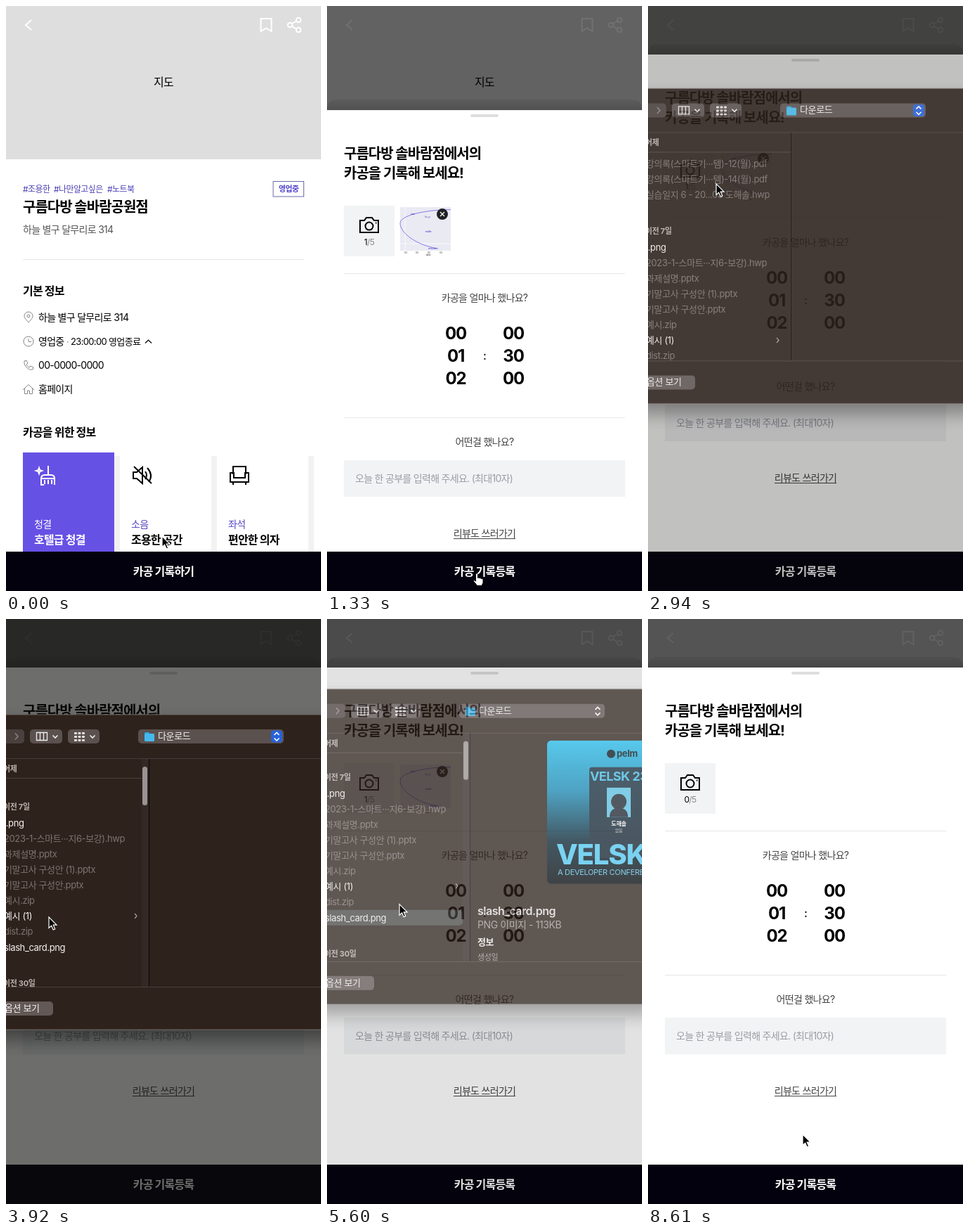
An HTML page for the animation above (9.03 s loop, 448 px wide and 832 px high).

```html
<!DOCTYPE html>
<html lang="ko">
<head>
<meta charset="utf-8">
<style>
html, body { margin: 0; width: 100%; height: 100%; overflow: hidden; background: #fff; }
#stage { display: block; width: 448px; height: 832px; }
text { font-family: Inter, "Noto Sans CJK KR", "Noto Sans CJK", sans-serif; letter-spacing: -.05em; white-space: pre; }
#dialog text { letter-spacing: -.03em; }
</style>
</head>
<body>
<svg id="stage" viewBox="0 0 448 832"></svg>
<script>
const LOOP = 9030;
const SHOP = '구름다방', ADDRESS = '하늘 별구 달무리로 314', EVENT = 'VELSK';

// y is the vertical middle of the line
const text = (x, y, size, str, fill = '#000', weight = 400, anchor = 'start') =>
  `<text x="${x}" y="${y + size * .36}" font-size="${size}" fill="${fill}" font-weight="${weight}" text-anchor="${anchor}">${str}</text>`;
const mid = (x, y, size, str, fill, weight) => text(x, y, size, str, fill, weight, 'middle');
const rect = (x, y, w, h, fill, r = 0, more = '') =>
  `<rect x="${x}" y="${y}" width="${w}" height="${h}" rx="${r}" fill="${fill}" ${more}/>`;
const path = (d, stroke, width = 1, more = '') =>
  `<path d="${d}" fill="none" stroke="${stroke}" stroke-width="${width}" ${more}/>`;
const divider = y => rect(24, y, 400, 1, '#e6e6e8');

function card(x, label, value, icon, active) {
  return (active ? rect(x, 635, 130, 141, '#6651e5') : rect(x, 635, 130, 141, '#fff') + rect(x + 130, 640, 8, 136, '#f2f2f3')) +
    path(icon, active ? '#fff' : '#000', 2, `transform="translate(${x + 16} 652)"`) +
    text(x + 16, 737, 14, label, active ? '#fff' : '#5546c4') +
    text(x + 16, 759, 16, value, active ? '#fff' : '#000', 700);
}

function page() {
  const rows = [443, 477, 511, 545];
  const icons = [
    'M8 15C4 10.500 2 8.500 2 6a6 6 0 0 1 12 0c0 2.500-2 4.500-6 9zM10 6a2 2 0 1 0-4 0a2 2 0 1 0 4 0',
    'M15 8a7 7 0 1 0-14 0a7 7 0 1 0 14 0M8 4v4.500h4',
    'M2 2l3-1l2 4l-2 2c1 2 2 3 4 4l2-2l4 2l-1 3C8 15.500 1 9 2 2z',
    'M0 9L8 1.500L16 9M2.500 7v7.500h4V10h3v4.500h4V7'
  ];
  return rect(0, 0, 448, 832, '#fff') + rect(0, 0, 448, 218, '#dedede') +
    path('M36 20L28 27L36 34M362.500 18H377.500V36L370 31.500L362.500 36ZM406 25.500L413 21.500M406 28.500L413 32.500', '#fff', 2) +
    [[404, 27], [416, 20], [416, 34]].map(([x, y]) =>
      `<circle cx="${x}" cy="${y}" r="3.300" fill="none" stroke="#fff" stroke-width="2"/>`).join('') +
    mid(224, 108, 16, '지도') +
    [[24, '#조용한'], [68, '#나만알고싶은'], [144, '#노트북']].map(([x, s]) => text(x, 261, 12, s, '#4d40b4')).join('') +
    rect(380, 249.5, 43.5, 21.5, '#fff', 0, 'stroke="#686ca6"') + mid(402, 260, 11, '영업중', '#5145d0', 700) +
    text(24, 286, 20, SHOP + ' 솔바람공원점', '#000', 700) +
    text(24, 318, 14, ADDRESS, '#555') + divider(360) +
    text(24, 405, 16, '기본 정보', '#000', 700) +
    rows.map((y, i) => path(icons[i], '#858585', 1, `transform="translate(24 ${y - 8})"`)).join('') +
    text(46, 443, 14, ADDRESS) + text(46, 477, 14, '영업중') + text(86, 477, 13, '·', '#888') +
    text(92, 477, 13, '23:00:00 영업종료') + path('M198 479.500L202.500 475L207 479.500', '#000', 1.2) +
    text(46, 511, 14, '00-0000-0000') + text(46, 545, 14, '홈페이지') +
    text(24, 606, 16, '카공을 위한 정보', '#000', 700) +
    rect(154, 640, 8, 136, '#f2f2f3') +
    card(24, '청결', '호텔급 청결', 'M20 2V14M10 29V20q0-5 5-5h9q5 0 5 5V29M10 20H29M15 22V28M20 22V28M25 22V28M9 29H14M7 5l1 3l3 1l-3 1l-1 3l-1-3l-3-1l3-1z', true) +
    card(162, '소음', '조용한 공간', 'M3 11H8L16 4V27L8 20H3ZM20 10q4 5 0 11M23 5q9 10 2 20M4 3L29 27') +
    card(300, '좌석', '편안한 의자', 'M7 14V3H25V14M3 12H8V19H24V12H29V25H3ZM7 25V29M25 25V29') +
    rect(438, 635, 10, 141, '#fff');
}

function poster(x, y, size) {
  return `<svg x="${x}" y="${y}" width="${size}" height="${size}" viewBox="0 0 204 204">` +
    rect(0, 0, 204, 204, 'url(#sea)', 6) +
    '<circle cx="91" cy="19" r="6" fill="#06141d"/>' + text(99, 18, 13, 'pelm', '#06141d', 700) +
    rect(60, 38, 84, 129, '#122331', 4, 'opacity=".93"') + mid(102, 51, 18, EVENT + ' 23', '#42bfe8', 700) +
    rect(85, 67, 34, 42, '#5cc4e8') +
    '<path d="M89 109q0-13 13-13t13 13z" fill="#1b2530"/><circle cx="102" cy="87" r="11" fill="#1b2530"/>' +
    mid(102, 118, 8, '도해솔', '#fff', 700) + mid(102, 128, 6, '없음', '#ccc') +
    text(13, 162, 40, EVENT + ' 23', '#53cdf7', 800) +
    text(15, 187, 11, 'A DEVELOPER CONFERENCE BY PELM', '#66c8ea') + '</svg>';
}

const closeMark = x => `<circle cx="${x}" cy="148" r="8" fill="#1f2024"/>` +
  path(`M${x - 3} 145l6 6m0-6l-6 6`, '#fff', 1.3);

function chart() {
  return rect(104, 138, 72, 62, '#eaeaf3') + path('M111 138V200M104 190H176', '#f8f8fc') +
    path('M176 141.500C137 142 104 150 104 161C104 174 126 192 158 197', '#5a4de0', .7) +
    [[122, 148, 'start'], [143, 152, 'f(x, y)'], [144, 173, 'middle'], [150, 197, 'end point']]
      .map(([x, y, s]) => mid(x, y, 3, s, '#3527c0')).join('') +
    [112, 128, 145, 162].map(x => mid(x, 203, 3, '0.5', '#222')).join('') +
    mid(144, 206, 3, 'value', '#222');
}

function sheet() {
  const digits = (x, list) => list.map((s, i) => mid(x, 317 + i * 32, 24, s, '#000', 700)).join('');
  return '<path d="M0 0V-2Q0-15 16-15H432Q448-15 448-2V0Z" fill="url(#lip)"/>' +
    rect(0, 0, 448, 832, '#fff') + rect(204, 6, 40, 4, '#dedede', 2) +
    text(24, 62, 20, SHOP + ' 솔바람점에서의', '#000', 700) + text(24, 90, 20, '카공을 기록해 보세요!', '#000', 700) +
    rect(24, 136, 72, 72, '#f2f3f5') +
    path('M47 157H53L56 153H64L67 157H73V174H47ZM65.500 165a5.500 5.500 0 1 0-11 0a5.500 5.500 0 1 0 11 0M69 160.500h1.500', '#000', 2) +
    mid(60, 188, 12, '<tspan id="count">1</tspan><tspan fill="#888">/5</tspan>') +
    `<g id="first">${chart()}${closeMark(164)}</g>` +
    `<g id="second">${poster(104, 136, 72)}${closeMark(164)}</g>` +
    divider(232) + mid(224, 267, 14, '카공을 얼마나 했나요?', '#444') +
    digits(183, ['00', '01', '02']) + digits(265, ['00', '30', '00']) + mid(224, 349, 16, ':', '#000', 500) +
    divider(437) + mid(224, 472, 14, '어떤걸 했나요?', '#444') +
    rect(24, 498, 400, 52, '#f2f3f5') + text(40, 524, 14, '오늘 한 공부를 입력해 주세요. (최대10자)', '#9b9ca5') +
    mid(224, 602, 14, '리뷰도 쓰러가기', '#444') + rect(180, 609, 88, 1, '#444');
}

function dialog() {
  const files = [
    [107, '강의록(스마트기···템)-12(월).pdf'], [129, '강의록(스마트기···템)-14(월).pdf'], [151, '실습일지 6 - 20...03 도해솔.hwp'],
    [226, 'l.png', 1], [248, '2023-1-스마트···지6-보강).hwp'], [270, '과제설명.pptx'], [292, '기말고사 구성안 (1).pptx'],
    [314, '기말고사 구성안.pptx'], [336, '예시.zip'], [358, '예시 (1)', 1], [380, 'dist.zip'], [403, 'slash_card.png', 1]
  ];
  const button = (x, w) => rect(x, 21, w, 20, '#5b514f', 5);
  const down = x => path(`M${x - 3.5} 29.500l3.500 3.500l3.500-3.500`, '#eee', 1.6);
  let grid = '';
  for (let i = 0; i < 9; i++) grid += rect(97 + i % 3 * 5.5, 25 + (i / 3 | 0) * 5, 4, 3, '#e8e4e2', 1);
  return rect(-20, 0, 488, 448, '#2d201e', 0, 'stroke="#6d625f" filter="url(#shade)"') +
    rect(-10, 21, 36, 20, '#4a403d', 5) + path('M13 26.500l4 4.500l-4 4.500', '#8b8380', 1.5) +
    button(34, 46) + path('M43.500 25.500h15v11h-15zM48.500 25.500v11M53.500 25.500v11', '#eee', 1.3) + down(70) +
    button(88, 45) + grid + down(123) +
    button(188, 207) + rect(197, 25, 7, 5, '#35a5db', 1.5) + rect(197, 27, 14, 11, '#45b9ee', 1.5) +
    text(216, 30, 13, '다운로드', '#f4f2f1') +
    `<g id="focus">${rect(377, 22.5, 16, 17, '#2762d9', 4)}</g>` +
    path('M381.500 29l3.500-3.500l3.500 3.500M381.500 33.500l3.500 3.500l3.500-3.500', '#fff', 1.6) +
    rect(0, 62, 448, 1, '#453b38') + rect(203, 63, 1, 324, '#080505') + rect(0, 387, 448, 1, '#4a403d') +
    rect(-10, 408, 77, 20, '#625856', 5) + text(-2, 417, 13, '옵션 보기', '#f4f2f1') +
    text(-4, 77, 11, '어제', '#b8b0ad', 700) + rect(0, 90, 203, 1, '#4a403d') +
    '<svg x="0" y="91" width="203" height="296"><g id="list">' +
    rect(-8, 392, 201, 22, '#4b4a48', 5, 'id="picked"') +
    files.map(([y, s, on]) => text(-3, y, 13, s, on ? '#f6f4f3' : '#7d7471')).join('') +
    path('M183 354.500l3 3.500l-3 3.500', '#aaa', 1.2) +
    text(-4, 203, 11, '이전 7일', '#b8b0ad', 700) + text(-4, 454, 11, '이전 30일', '#b8b0ad', 700) +
    '</g></svg>' +
    `<g id="bar">${rect(193, 63, 10, 324, '#332825')}${rect(194, 74, 7, 55, '#9b9391', 3.5)}</g>` +
    '<g id="preview">' + poster(313, 73, 204) +
    text(214, 315, 16, 'slash_card.png', '#e4e0df', 600) + text(214, 335, 14, 'PNG 이미지 - 113KB', '#a59d9a') +
    text(214, 359, 13, '정보', '#f4f2f1', 700) + text(214, 381, 11, '생성일', '#a59d9a') + '</g>';
}

document.getElementById('stage').innerHTML = `<defs>
  <linearGradient id="sea" x2="0" y2="1"><stop stop-color="#22bff0"/><stop offset=".35" stop-color="#178bb8"/><stop offset=".7" stop-color="#062433"/><stop offset="1" stop-color="#01060a"/></linearGradient>
  <linearGradient id="lip" x2="0" y2="1"><stop stop-color="#000" stop-opacity=".06"/><stop offset="1" stop-color="#000" stop-opacity=".18"/></linearGradient>
  <filter id="shade" x="-10%" y="-10%" width="120%" height="125%"><feDropShadow dx="0" dy="14" stdDeviation="12" flood-opacity=".4"/></filter>
  </defs>` + page() +
  rect(0, 0, 448, 832, '#000', 0, 'id="veil"') + `<g id="sheet">${sheet()}</g>` +
  rect(0, 776, 448, 56, '#03010d') + mid(224, 804, 16, '<tspan id="label"></tspan>', '#fff', 700) +
  rect(0, 0, 448, 832, '#0c0c0a', 0, 'id="dim"') + `<g id="dialog">${dialog()}</g>` +
  `<g id="cursor">
    <path id="arrow" d="M0 0V15.500L3.600 12.200L6.200 18L8.700 17L6.200 11.200H11Z" fill="#000" stroke="#fff" stroke-width="1.200"/>
    <path id="hand" d="M-1.500 1.500c0-2 3-2 3 0v5c1-1 2.400-.6 2.500.5c1-.8 2.400-.3 2.500.8c1.200-.6 2.500 0 2.500 1.500v3c0 2-1.500 3-1.500 5h-7.500c0-2-4-4.500-4.500-6.500c0-1.700 1.600-1.500 3 .4z" fill="#fff" stroke="#000"/>
  </g>`;

const el = {};
document.querySelectorAll('[id]').forEach(n => el[n.id] = n);

// time, x, y of the pointer tip
const route = [
  [0, 222, 754], [40, 222, 754], [210, 214, 806], [420, 214, 806], [490, 213, 807], [1400, 213, 807], [1820, 158, 482], [1930, 158, 482],
  [2520, 53, 222], [2600, 53, 222], [2660, 97, 253], [2960, 97, 253], [3570, 61, 424],
  [4300, 61, 424], [4830, 61, 462], [5400, 61, 462], [6020, 231, 234], [6230, 231, 234],
  [6720, 167, 220], [7780, 167, 220], [8050, 170, 240], [8200, 170, 240], [8610, 220, 733], [LOOP, 220, 733]
];
const handTimes = [[190, 1400], [2450, 2630], [4930, 5450], [6900, 7640]];

const clamp = v => Math.max(0, Math.min(1, v));
const within = (t, a, b) => t >= a && t < b;
const show = (name, on) => el[name].style.display = on ? '' : 'none';
const move = (name, x, y) => el[name].setAttribute('transform', `translate(${x} ${y})`);

function pointer(t) {
  const i = route.findIndex(p => p[0] > t);
  const [t0, x0, y0] = route[i - 1], [t1, x1, y1] = route[i];
  const u = (t - t0) / (t1 - t0), e = u * u * (3 - 2 * u);
  return [x0 + (x1 - x0) * e, y0 + (y1 - y0) * e];
}

function draw(t) {
  // critically damped spring
  const w = Math.max(0, t - 1033) * .013;
  const rise = 1 - (1 + w) * Math.exp(-w);
  move('sheet', 0, 850 - 781 * rise);
  show('sheet', t > 1033);
  el.veil.setAttribute('opacity', .62 * rise);
  el.label.textContent = t < 1040 ? '카공 기록하기' : '카공 기록등록';

  el.count.textContent = t < 5800 ? 1 : t < 7110 ? 2 : t < 7580 ? 1 : 0;
  show('first', t < 7110);
  show('second', within(t, 5800, 7580));
  move('second', t < 7110 ? 80 : 0, 0);

  const open = clamp((t - 2814) / 300) * clamp(1 - (t - 5360) / 300);
  el.dim.setAttribute('opacity', .6 * open);
  show('dialog', open > 0);
  el.dialog.setAttribute('opacity', open ** .2);
  move('dialog', 0, 136 - 56 * (1 - open) ** 2);
  move('list', 0, -91 - 78 * (1 - (1 - clamp((t - 3740) / 320)) ** 3));
  show('bar', t > 3740);
  show('picked', t >= 4970);
  show('preview', t >= 5040);
  show('focus', t < 5360);

  const hand = handTimes.some(([a, b]) => within(t, a, b));
  show('hand', hand);
  show('arrow', !hand);
  move('cursor', ...pointer(t));
}

function tick() {
  draw(performance.now() % LOOP);
  requestAnimationFrame(tick);
}
tick();
</script>
</body>
</html>
```
